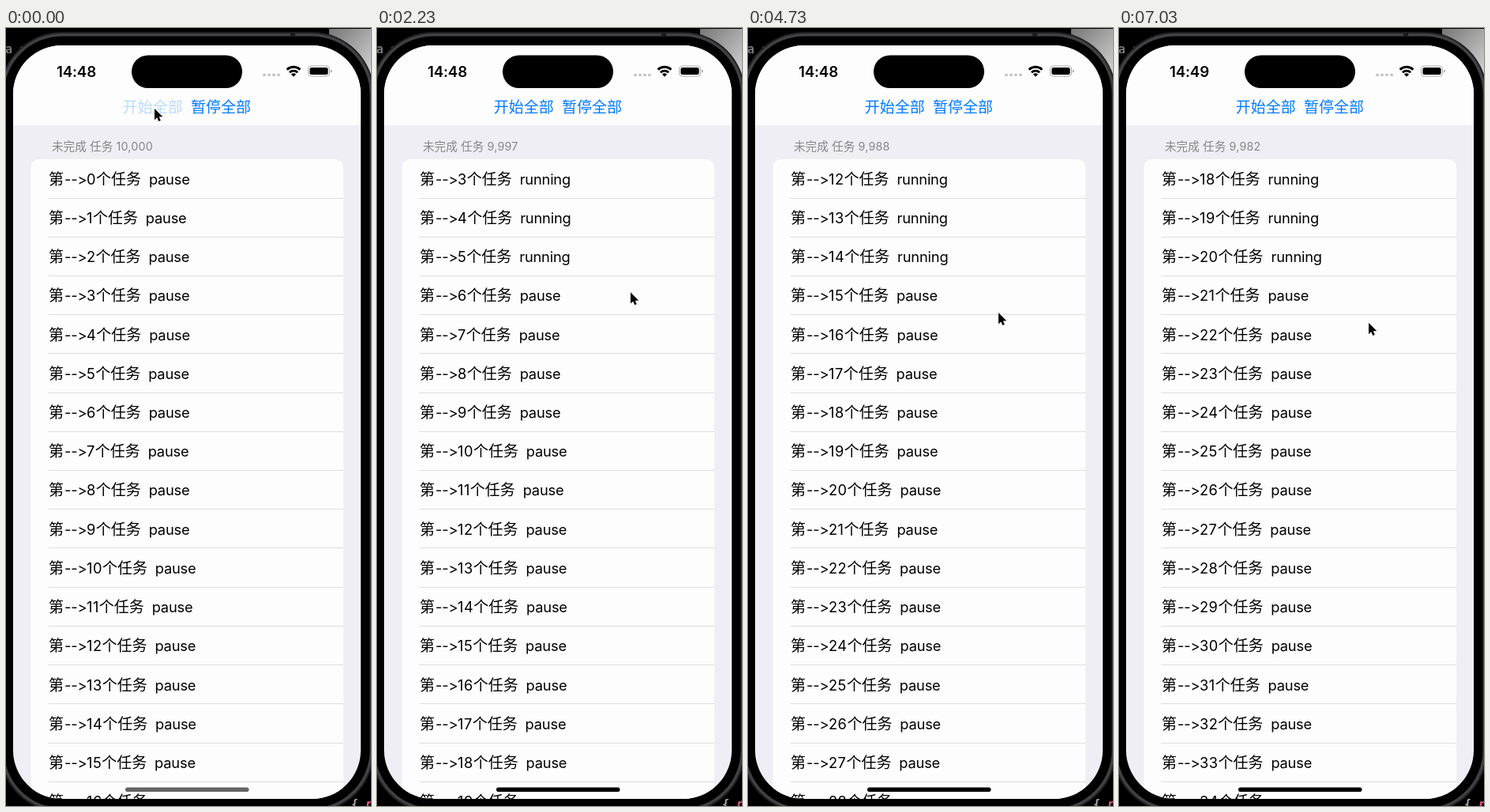
An HTML page for the animation above (7.06 s loop, 462 by 984 pixels).

```html
<!DOCTYPE html>
<html lang="zh-CN">
<head>
<meta charset="utf-8">
<title>任务</title>
<style>
html, body { margin: 0; width: 100%; height: 100%; overflow: hidden; background: #000; }
svg { display: block; width: 100%; height: 100%; }
text {
  font: 18.3px Inter, "Noto Sans CJK SC", "Noto Sans CJK", sans-serif;
  font-feature-settings: "calt" 0, "liga" 0;
  letter-spacing: -.2px;
  white-space: pre;
}
.cjk { font: 19px "Noto Sans CJK SC", "Noto Sans CJK", sans-serif; letter-spacing: 0; }
.num { letter-spacing: .45px; }
.blue { fill: #007aff; }
#count { font-size: 14.3px; fill: #86868b; letter-spacing: .2px; }
#count .cjk { font-size: 14.6px; }
#clock { font-size: 18.8px; font-weight: 600; text-anchor: middle; }
.code { font: bold 15px "DejaVu Sans Mono", monospace; }
</style>
</head>
<body>
<svg viewBox="0 0 462 984">
  <defs>
    <linearGradient id="grey" x2="1" y2="1">
      <stop stop-color="#777"/><stop offset="1" stop-color="#d4d4d4"/>
    </linearGradient>
    <clipPath id="clip"><rect id="screen"/></clipPath>
  </defs>
  <rect x="409" y="1" width="53" height="59" fill="url(#grey)"/>
  <text class="code" x="-1" y="32" fill="#777">a s</text>
  <rect id="frame" fill="#202022"/>
  <rect id="ring" fill="#414143"/>
  <rect id="bezel"/>
  <path d="M360 6h6v5h-6z" fill="#1a1a1c"/>
  <text class="code" x="437" y="987" fill="#aaa">{ <tspan fill="#e0568c" font-style="italic">r</tspan></text>

  <g clip-path="url(#clip)">
    <rect width="462" height="984" fill="#efeef4"/>
    <rect width="462" height="123" fill="#fdfdfd"/>
    <rect x="31.5" y="166" width="395.5" height="840" rx="10" fill="#fdfdfd"/>
    <text id="count" x="58" y="155.4"></text>
    <g id="rows"></g>
    <text id="clock" x="89" y="61.8"></text>
    <rect x="159" y="34.5" width="140" height="41.5" rx="20.7"/>
    <g fill="#c4c4c6">
      <circle cx="327" cy="59.3" r="1.9"/><circle cx="333" cy="59.3" r="1.9"/>
      <circle cx="339" cy="59.3" r="1.9"/><circle cx="345" cy="59.3" r="1.9"/>
    </g>
    <g fill="none" stroke="#000" stroke-width="2.9">
      <path d="M355.6 52.6a12.3 12.3 0 0 1 16.8 0M358.9 56.2a7.4 7.4 0 0 1 10.2 0"/>
    </g>
    <path d="M364 61.8l-3.1-3.2a4.4 4.4 0 0 1 6.2 0z"/>
    <rect x="382.5" y="48" width="27" height="13" rx="4" fill="none" stroke="#a8a8aa"/>
    <rect x="384.4" y="49.9" width="23.2" height="9.2" rx="2.5"/>
    <path d="M411 52.4q1.8.6 1.8 2.1t-1.8 2.1z" fill="#a8a8aa"/>
    <text id="start" class="cjk blue" x="147.7" y="106.5">开始全部</text>
    <text class="cjk blue" x="234" y="106.5">暂停全部</text>
    <rect id="home" x="151" y="960.5" width="156.5" height="5.6" rx="2.8"/>
  </g>
  <path id="cursor" d="M0 0V14.2L3.2 11.3 5.3 16 7.8 14.9 5.8 10.3H10.3Z"
    stroke="#fff" stroke-width="1.6" paint-order="stroke" stroke-linejoin="round"/>
</svg>
<script>
const LOOP = 7060, BATCH = 3, TASKS = 10000;
const DONE = [1270, 2400, 3530, 4640, 5770, 6900];
const PATH = [
  [0, 188, 102], [120, 188, 102], [530, 198, 146], [760, 258, 226], [1270, 323, 312],
  [2200, 321, 334], [3070, 319, 344], [3500, 319, 344], [4200, 317, 354], [5070, 317, 364],
  [5370, 317, 364], [5530, 316, 371], [5770, 316, 371], [6130, 316, 373], [LOOP, 316, 373]
];
const $ = id => document.getElementById(id);
const ramp = (t, a, b) => Math.min(1, Math.max(0, (t - a) / (b - a)));

function setAll(id, attrs) {
  for (const k in attrs) $(id).setAttribute(k, attrs[k]);
}

// Rounded rectangle grown outward from the screen edge
function shell(id, grow) {
  setAll(id, {
    x: 9 - grow, y: 22 - grow, width: 440 + 2 * grow, height: 953 + 2 * grow, rx: 61.6 + grow
  });
}
shell('screen', 0);
shell('bezel', 11.5);
shell('ring', 15);
shell('frame', 17);

const cjk = s => `<tspan class="cjk">${s}</tspan>`;

function row(i, first) {
  const state = first && i < BATCH ? 'running' : 'pause';
  const y = 197.6 + 49.23 * i;
  return `<text x="54" y="${y}">${cjk('第')}<tspan x="74">--&gt;</tspan>` +
    `<tspan class="num" x="102">${first + i}</tspan>${cjk('个任务')}  ${state}</text>` +
    `<rect x="53.5" y="${Math.floor(215 + 49.22 * i)}" width="373.5" height="1" fill="#dedee0"/>`;
}

let shown = -1;
function showList(first) {
  if (first === shown) return;
  shown = first;
  $('count').innerHTML = cjk('未完成') + ' ' + cjk('任务') + ' ' +
    (TASKS - first).toLocaleString('en-US');
  $('rows').innerHTML = Array.from({ length: 17 }, (_, i) => row(i, first)).join('');
}

function draw() {
  const t = performance.now() % LOOP;
  showList(BATCH * DONE.filter(d => t >= d).length);
  $('clock').textContent = t < 5370 ? '14:48' : '14:49';
  setAll('start', { opacity: .26 + .74 * ramp(t, 60, 400) });
  const g = Math.round(100 * (1 - ramp(t, 850, 1200)));
  setAll('home', { fill: `rgb(${g},${g},${g})` });

  const k = PATH.findIndex(p => p[0] > t);
  const [a, x, y] = PATH[k - 1], [b, x2, y2] = PATH[k];
  const f = ramp(t, a, b);
  setAll('cursor', { transform: `translate(${x + (x2 - x) * f} ${y + (y2 - y) * f})` });
  requestAnimationFrame(draw);
}
draw();
</script>
</body>
</html>
```
